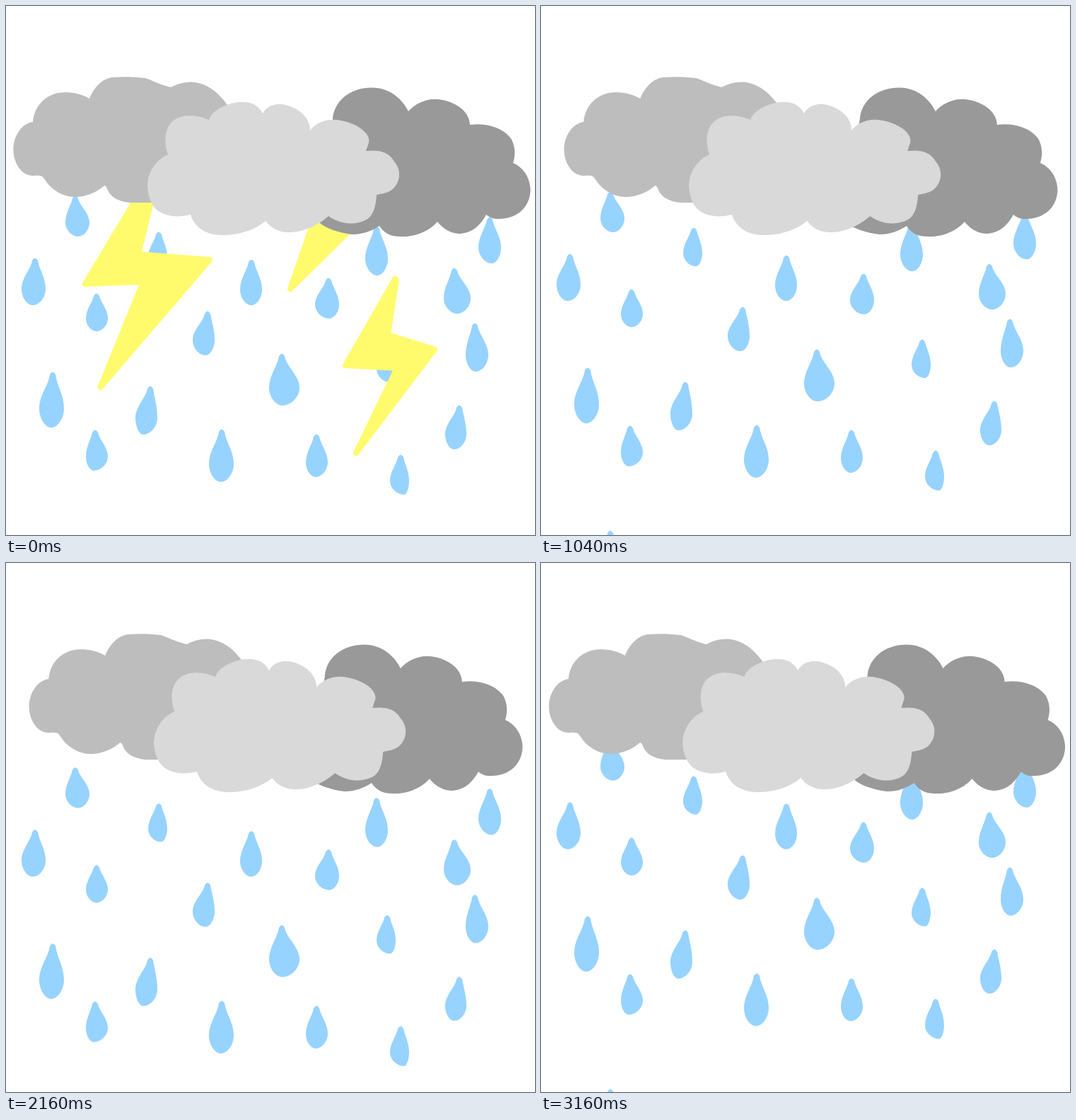
Recreate the animation shown at these times as an HTML page. Size 748 px wide and 748 px high, loop 3.2 s.

```html
<!DOCTYPE html>
<html lang="en">
<head>
<meta charset="utf-8">
<title>Thunderstorm</title>
<style>
  html, body { margin: 0; width: 100%; height: 100%; overflow: hidden; background: #fff; }
  svg { display: block; width: 100vw; height: 100vh; }
  #rain { fill: #97d3ff; }
  #bolts { fill: #fffb6d; stroke: #fffb6d; stroke-width: 8; stroke-linejoin: round; }
</style>
</head>
<body>
<svg viewBox="0 0 748 748">
  <defs>
    <path id="drops"/>
    <clipPath id="sky"><rect y="200" width="748" height="548"/></clipPath>
  </defs>
  <g id="rain" clip-path="url(#sky)">
    <use href="#drops"/>
    <use href="#drops"/>
    <use href="#drops"/>
  </g>
  <g id="bolts">
    <path d="M191 261L209 261L187 351L288 359L133.500 539L194 390L112 393Z"/>
    <path d="M440 290L505 299L402 400Z"/>
    <path d="M550 386L552 387L540 465L606 485.500L495 632L553 512L480 508Z"/>
  </g>
  <path class="cloud" fill="#bdbdbd" d="M38 164C40 140 58 122 84 122C98 122 110 126 118 131
    C124 116 135 103 150 101C165 99.500 180 100 197 102C205 104 214 110 233 115
    C242 110 253 107 264 107.500C285 109 302 124 313 140L330 200L300 278L175 278
    C155 276 148 268 144 261Q142 254 139 254C128 264 112 270 98 270C80 270 66 260 58 250
    C54 244 52 240 48 240C44 239 38 241 32 239C20 236 10.400 220 10.400 203C10.400 184 22 166 38 164Z"/>
  <path class="cloud" fill="#999" d="M462 160C463 140 480 117 515 115.500C540 114 560 130 569 149
    C578 138 595 130 612 132C635 135 655 148 656 168C675 165 700 170 713 186C720 196 721 210 717 222
    C732 228 742 244 741.500 262C740 285 722 302 695 301C690 301 685 300 679 295
    C672 308 660 322 640 322C627 321 617 314 610 305C600 317 580 327 558 326
    C545 326 535 322 528 311C517 318 505 323 490 323C470 321 450 313 443 306L470 250L460 172Z"/>
  <path class="cloud" fill="#d9d9d9" d="M229 210C224 196 224 180 230 170C240 153 264 151 287 161
    C290 150 305 141 322 137C342 133 356 138 363 152C368 141 382 136 396 140C415 145 430 158 430 176
    C438 165 455 158 474 162C496 166 516 180 513 193L509 205C528 203 541 206 549 220
    C558 230 558 244 551 254C545 264 533 265 524 267C523 280 521 295 510 302
    C490 312 470 307 456 297C446 306 425 320 400 320C385 320 375 314 367 304
    C355 314 335 324 305 324C280 324 265 310 261 295C245 299 225 299 212 287
    C200 275 197 250 203 238C208 224 218 215 229 210Z"/>
</svg>
<script>
  const LOOP = 3200, STEP = 40, SWAY = 800, FALL = 0.455, BOLTS_END = 1040;

  // tip x, top, left, right, bottom, bottom x
  const drops = [
    [98, 268, 84, 118, 326, 102], [216, 319, 201, 228, 374, 219],
    [41, 356, 22, 56, 423, 38], [128, 406, 113, 144, 460, 128],
    [285, 431, 264, 295, 494, 282], [347, 358, 331, 362, 423, 347],
    [390, 491, 372, 415, 565, 391], [456, 384, 437, 471, 442, 457],
    [524, 311, 508, 540, 381, 525], [539, 477, 524, 551, 532, 543],
    [634, 370, 619, 657, 435, 638], [663, 448, 650, 682, 517, 664],
    [684, 298, 668, 700, 364, 687], [641, 564, 621, 651, 627, 634],
    [66, 517, 47, 82, 596, 64], [204, 537, 183, 214, 606, 194],
    [126, 599, 113, 144, 657, 124], [305, 598, 287, 322, 673, 304],
    [439, 605, 424, 455, 666, 438], [558, 634, 543, 570, 691, 563]
  ];

  function dropPath([x, top, left, right, bottom, bx]) {
    const y = k => top + (bottom - top) * k;
    const mix = (a, b) => a + (b - a) * 0.5;
    return `M${x - 4} ${top + 4}Q${x} ${top - 3} ${x + 4} ${top + 4}` +
      `C${x + 6} ${y(0.25)} ${right} ${y(0.42)} ${right} ${y(0.66)}` +
      `C${right} ${y(0.84)} ${mix(bx, right)} ${bottom} ${bx} ${bottom}` +
      `C${mix(bx, left)} ${bottom} ${left} ${y(0.84)} ${left} ${y(0.66)}` +
      `C${left} ${y(0.42)} ${x - 6} ${y(0.25)} ${x - 4} ${top + 4}Z`;
  }

  document.getElementById('drops').setAttribute('d', drops.map(dropPath).join(''));
  const sheets = document.querySelectorAll('#rain use');
  const bolts = document.getElementById('bolts');
  const clouds = document.querySelectorAll('.cloud');
  const sways = [34, -17, 14];
  // Moments at which each sheet of rain passes its rest position
  const passes = [0, 1053, 2115];

  function draw(now) {
    const t = Math.floor((now % LOOP) / STEP) * STEP;
    const sway = (1 - Math.cos(2 * Math.PI * t / SWAY)) / 2;
    clouds.forEach((c, i) => c.setAttribute('transform', `translate(${sways[i] * sway} 0)`));
    sheets.forEach((s, i) => {
      // The first sheet re-enters from above in the second half of the loop
      const pass = i === 0 && t > LOOP / 2 ? LOOP : passes[i];
      s.setAttribute('transform', `translate(0 ${(t - pass) * FALL})`);
    });
    bolts.style.display = t < BOLTS_END ? '' : 'none';
  }

  const start = performance.now();
  function tick() {
    draw(performance.now() - start);
    requestAnimationFrame(tick);
  }
  tick();
</script>
</body>
</html>
```
